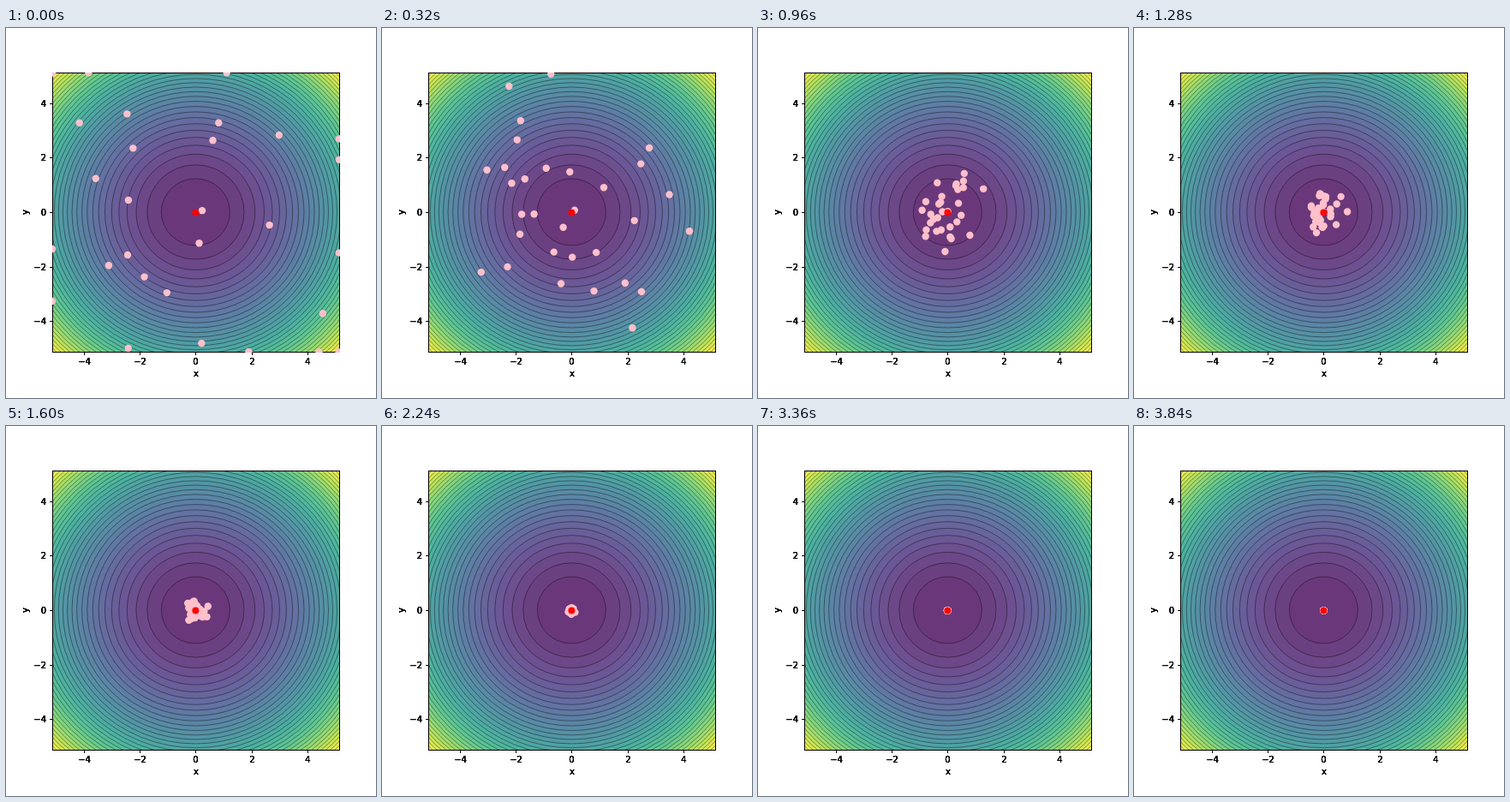
Animation of 432x432 px, one loop 9980 ms. Source, as an HTML page with a canvas:

```html
<!DOCTYPE html>
<html lang="en">
<head>
<meta charset="utf-8">
<style>
  html, body { margin: 0; width: 100%; height: 100%; overflow: hidden; background: #fff; }
  canvas { display: block; }
</style>
</head>
<body>
<canvas id="stage" width="432" height="432"></canvas>
<script>
const ctx = document.getElementById('stage').getContext('2d');
const LOOP = 9980, STEP = 160, LAST = 24, SWARM = 31;
const LEFT = 54, TOP = 51.84, WIDTH = 334.8, HEIGHT = 326.16, LIMIT = 5.12;
const CX = LEFT + WIDTH / 2, CY = TOP + HEIGHT / 2;
const SX = WIDTH / 2 / LIMIT, SY = HEIGHT / 2 / LIMIT;
const LEVEL = 1.5, LEVELS = 35;
const VIRIDIS = ['#440154', '#482878', '#3e4989', '#31688e', '#26828e',
  '#1f9e89', '#35b779', '#6ece58', '#b5de2b', '#fde725'];

let seed = 7;
function random(min, max) {
  seed = (seed * 16807) % 2147483647;
  return min + (max - min) * seed / 2147483647;
}

const swarm = Array.from({ length: SWARM }, () => ({
  x: random(-1, 1), y: random(-1, 1), turn: random(-0.5, 0.5)
}));

const clamp = v => Math.max(-LIMIT, Math.min(LIMIT, v));

// The swarm starts wider than the domain, then swirls in with exponential decay.
function position({ x, y, turn }, step) {
  const spread = 1.4 * LIMIT * Math.exp(-0.3 * step);
  const c = Math.cos(turn * step), s = Math.sin(turn * step);
  return [clamp(spread * (x * c - y * s)), clamp(spread * (x * s + y * c))];
}

function viridis(v) {
  const pos = v * (VIRIDIS.length - 1), i = Math.floor(pos);
  return `color-mix(in srgb, ${VIRIDIS[i]}, ${VIRIDIS[i + 1]} ${(pos - i) * 100}%)`;
}

function contour(level) {
  const r = Math.sqrt(level * LEVEL);
  ctx.beginPath();
  ctx.ellipse(CX, CY, r * SX, r * SY, 0, 0, Math.PI * 2);
}

function drawSurface() {
  for (let i = LEVELS; i > 0; i--) {
    contour(i);
    ctx.fillStyle = viridis((i - 0.5) / LEVELS);
    ctx.fill();
  }
  ctx.fillStyle = 'rgba(255, 255, 255, 0.2)';
  ctx.fillRect(54, 52, 336, 327);
  ctx.strokeStyle = 'rgba(0, 0, 0, 0.4)';
  ctx.lineWidth = 1;
  for (let i = 1; i < LEVELS; i++) {
    contour(i);
    ctx.stroke();
  }
}

// Repeated drawing hardens the antialiased edges of the letters.
function label(text, x, y, align = 'center') {
  ctx.textAlign = align;
  for (let i = 0; i < 5; i++) ctx.fillText(text, x, y);
}

function drawAxes() {
  ctx.strokeStyle = ctx.fillStyle = '#000';
  ctx.lineWidth = 1;
  ctx.strokeRect(54.5, 52.5, 335, 326);
  ctx.font = '10px "DejaVu Sans", sans-serif';
  for (let v = -4; v <= 4; v += 2) {
    const x = Math.round(CX + v * SX), y = Math.round(CY - v * SY);
    const text = String(v).replace('-', '\u2212');
    ctx.fillRect(x, 379, 1, 3);
    ctx.fillRect(51, y, 3, 1);
    label(text, x + 0.5, 393);
    label(text, 47, y + 4, 'right');
  }
  label('x', CX + 0.5, 407);
  ctx.save();
  ctx.translate(26, CY);
  ctx.rotate(-Math.PI / 2);
  label('y', 0, 0);
  ctx.restore();
}

function dot(x, y, color, radius) {
  ctx.fillStyle = color;
  ctx.beginPath();
  ctx.arc(CX + x * SX, CY + 0.5 - y * SY, radius, 0, Math.PI * 2);
  ctx.fill();
}

function clipped(paint) {
  ctx.save();
  ctx.beginPath();
  ctx.rect(54, 52, 336, 327);
  ctx.clip();
  paint();
  ctx.restore();
}

function draw(step) {
  ctx.fillStyle = '#fff';
  ctx.fillRect(0, 0, 432, 432);
  clipped(drawSurface);
  drawAxes();
  clipped(() => {
    for (const p of swarm) dot(...position(p, step), '#ffc0cb', 4.2);
    dot(0, 0, '#f00', 4);
  });
}

let shown = -1;
function tick() {
  const step = Math.min(LAST, Math.floor(performance.now() % LOOP / STEP));
  if (step !== shown) draw(shown = step);
  requestAnimationFrame(tick);
}
tick();
</script>
</body>
</html>
```
